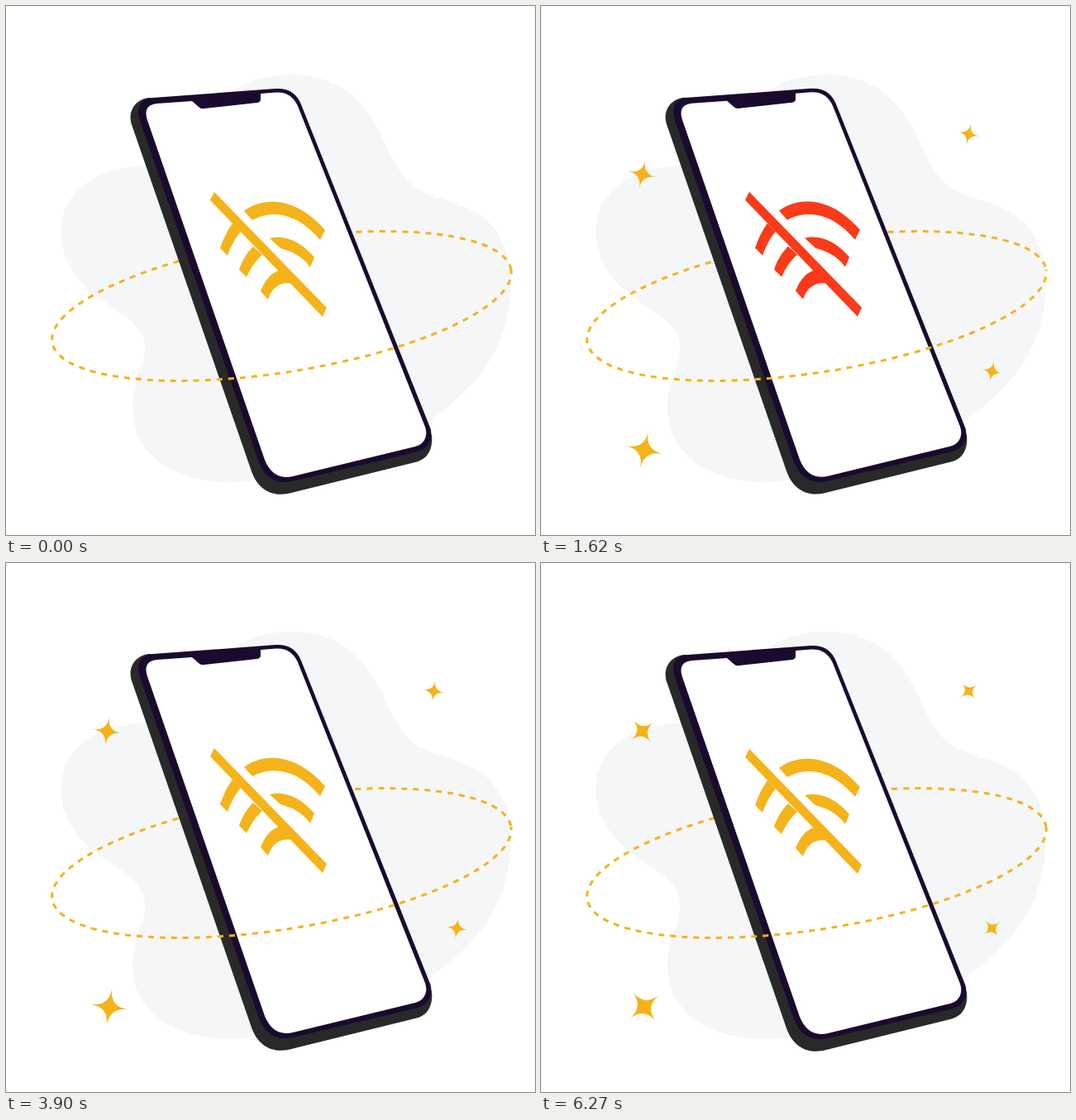
Write an HTML page that moves like this. It is 640 px wide and 640 px high and loops after 6.33 s.

```html
<!DOCTYPE html>
<html lang="en">
<head>
<meta charset="utf-8">
<title>No connection</title>
<style>
html, body { margin: 0; width: 100%; height: 100%; overflow: hidden; background: #fff; }
svg { display: block; width: 100vw; height: 100vh; }
</style>
</head>
<body>
<svg viewBox="0 0 640 640">
  <defs>
    <clipPath id="back"><rect width="640" height="365"/></clipPath>
    <clipPath id="front"><rect y="365" width="640" height="275"/></clipPath>
    <path id="star" d="M0-1Q0 0 1 0Q0 0 0 1Q0 0-1 0Q0 0 0-1Z"/>
    <ellipse id="orbit" rx="281" ry="80" transform="translate(333.5 363) rotate(-9)" fill="none" stroke="#f5b31a" stroke-width="3" stroke-dasharray="7"/>
  </defs>

  <path fill="#f4f6f8" d="M345 83C395 83 428 107 450 148C468 182 474 211 508 226C540 240 581 242 601 286C612 312 612 338 608 368C599 420 570 461 515 500C440 550 340 575 268 576C200 574 154 543 153 487C153 452 169 440 168 411C167 376 113 364 85 327C64 300 60 262 77 235C99 202 135 196 170 193C220 185 240 115 285 97C303 87 325 83 345 83Z"/>

  <g clip-path="url(#back)"><use href="#orbit"/></g>

  <g id="phone">
    <path fill="#292929" d="M175 111C160 111 147 124 151.500 142L296 560C303 582 318 594 341 590L497 551.500C510 548 517 536 515 519L340 300Z"/>
    <path fill="#1a0b2e" d="M178 111L326 100C342 99 352 106 357 119L513.500 511C517 524 511 535 499 539L347 575C327 580 313 570 306 552L162 139C157 123 162 112 178 111Z"/>
    <path fill="#fff" d="M183 118L225 115L233 122Q236 125 240 124L304 117Q308 116 308 113V106L327 104.500C340 104 348 110 353 121L507 509C511 520 506 530 495 533L347 569C330 573 319 564 313 549L171 138C167 126 171 119 183 118Z"/>
    <g id="signal">
      <path d="M252 225L388 365L383 376L247 235Z"/>
      <path d="M288 248C312 230 351 231 386 271L380 283C352 250 322 246 298 259Z"/>
      <path d="M319 281C338 276 358 286 373 304L368 316C357 301 345 297 332 293Z"/>
      <path d="M274 263L284 273C277 281 272 291 268 302L259 293C263 281 268 271 274 263Z"/>
      <path d="M299 291L310 301C302 308 296 317 291 328L282 319C286 307 292 298 299 291Z"/>
      <path d="M308 345C314 330 322 322 331 320L348 336C332 333 322 340 317 355Z"/>
    </g>
  </g>

  <g clip-path="url(#front)"><use href="#orbit"/></g>

  <g fill="#f5b31a">
    <g transform="translate(122.5 203.5) scale(18)"><use class="star" href="#star"/></g>
    <g transform="translate(517.5 155) scale(13.3)"><use class="star" href="#star"/></g>
    <g transform="translate(545.5 442) scale(13.3)"><use class="star" href="#star"/></g>
    <g transform="translate(125 537) scale(23.3)"><use class="star" href="#star"/></g>
  </g>
</svg>
<script>
const LOOP = 6330, STEP = 30;
const BOB = 2010, REST = 5720, HEIGHT = 11; // bobbing period, moment it stops, travel
const BLINK = 1540;
const $ = id => document.getElementById(id);
const stars = document.querySelectorAll('.star');

function draw(t) {
  const intro = Math.sin(Math.PI / 2 * Math.min(1, t / 800));

  const phase = 2 * Math.PI * (Math.min(t, REST) - REST) / BOB;
  const lift = intro * HEIGHT * (1 - Math.cos(phase)) / 2;
  $('phone').setAttribute('transform', `translate(0 ${-lift})`);

  $('signal').setAttribute('fill', Math.floor(t / BLINK) % 2 ? '#fa3a18' : '#f5b31a');
  $('orbit').setAttribute('stroke-dashoffset', 1.5 + 70 * t / LOOP);

  // The spin gathers speed slowly and eases off near the end
  const angle = 288 * (1 - Math.cos(0.00034 * t)) - 30;
  for (const star of stars) star.setAttribute('transform', `rotate(${angle}) scale(${intro})`);
}

const start = performance.now();
function tick() {
  const t = (performance.now() - start) % LOOP;
  draw(Math.min(LOOP - 2 * STEP, Math.floor(t / STEP) * STEP));
  requestAnimationFrame(tick);
}
tick();
</script>
</body>
</html>
```
